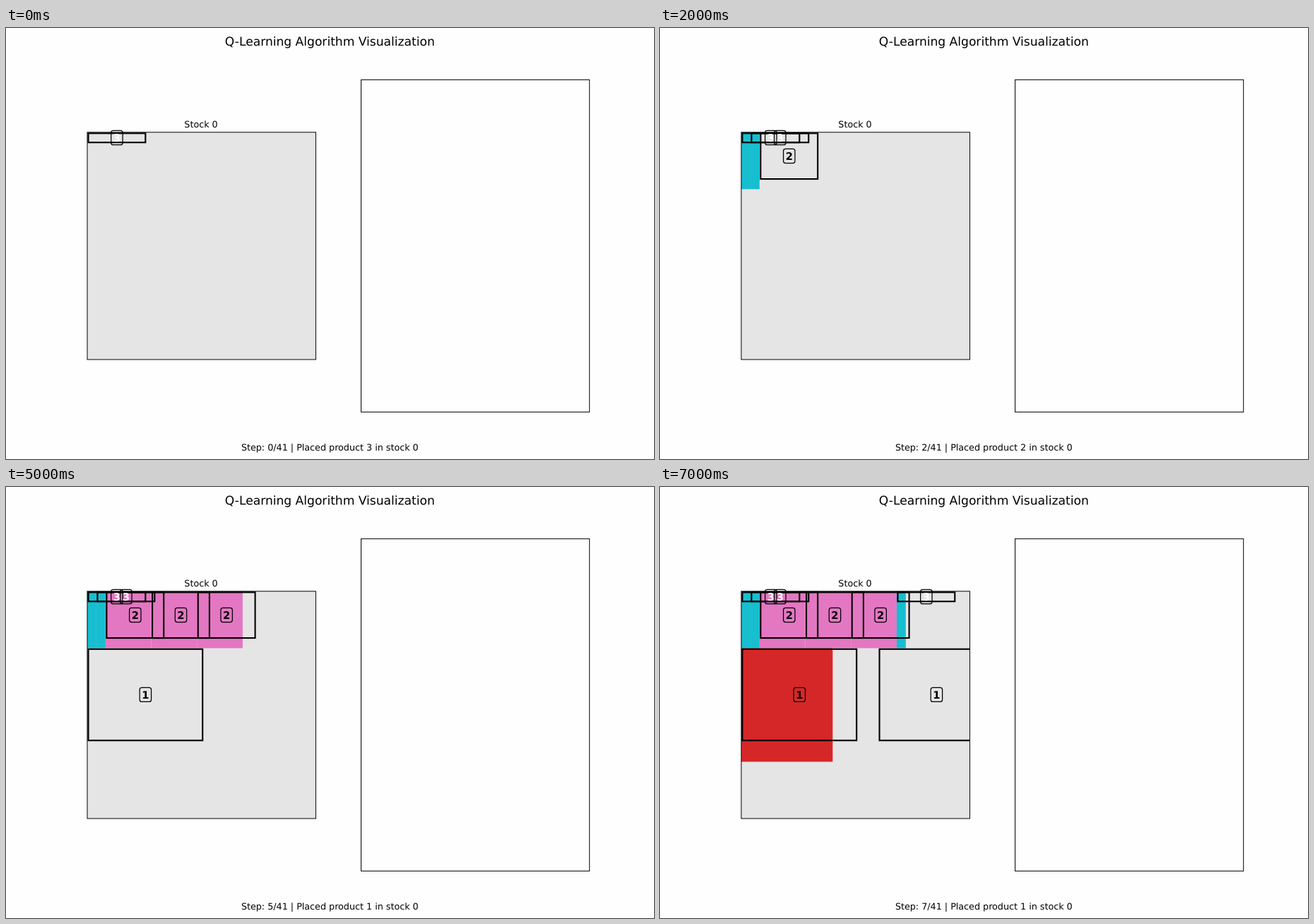
Write an HTML page that moves like this. It is 917 by 611 pixels and loops after 8 s.

```html
<!DOCTYPE html>
<html lang="en">
<head>
<meta charset="utf-8">
<title>Q-Learning Algorithm Visualization</title>
<style>
  html, body { margin: 0; height: 100%; overflow: hidden; background: #fefefe; }
  svg { display: block; }
  text { font-family: "DejaVu Sans", sans-serif; font-size: 12.72px; text-anchor: middle; text-rendering: geometricPrecision; }
  .frame { fill: none; stroke: #000; }
  .outline { fill: none; stroke: #000; stroke-width: 2.1; }
  .badge { fill: none; stroke: #000; stroke-width: 1.25; }
  .digit { font-size: 14.7px; font-weight: bold; }
</style>
</head>
<body>
<svg width="917" height="611" viewBox="0 0 917 611">
  <clipPath id="stock"><rect x="115" y="148" width="323.4" height="322"/></clipPath>
  <text x="458.3" y="25" style="font-size:17.1px">Q-Learning Algorithm Visualization</text>
  <text x="276" y="140.6">Stock 0</text>
  <rect x="115" y="148" width="323.4" height="322" fill="#e5e5e5"/>
  <g id="fills"></g>
  <g id="outlines" clip-path="url(#stock)"></g>
  <rect class="frame" x="115" y="147.8" width="323.4" height="322.2"/>
  <rect class="frame" x="502.5" y="73.4" width="323.2" height="471"/>
  <g id="labels"></g>
  <text id="status" x="458.3" y="599"></text>
</svg>
<script>
const STEP_MS = 1000, COL = 12.936, ROW = 16.1;
const products = {
  1: { w: 10, h: 10, color: '#d62728', ink: '#000' },
  2: { w: 5, h: 5, color: '#e377c2', ink: '#000' },
  3: { w: 1, h: 5, color: '#17becf', ink: '#fff' },
};
// Each placement: product, column, row
const placements = [
  [3, 0, 0], [3, 1, 0], [2, 2, 0], [2, 7, 0],
  [2, 12, 0], [1, 0, 5], [3, 17, 0], [1, 15, 5],
];

const byId = id => document.getElementById(id);

function add(parent, tag, attrs, text = '') {
  const el = document.createElementNS('http://www.w3.org/2000/svg', tag);
  for (const key in attrs) el.setAttribute(key, attrs[key]);
  el.textContent = text;
  return byId(parent).appendChild(el);
}

const steps = placements.map(([id, col, row]) => {
  const { w, h, color, ink } = products[id];
  const fill = add('fills', 'rect', {
    x: 115 + col * COL, y: 148 + row * ROW, width: w * COL, height: h * ROW, fill: color,
  });
  // Outlines have width and height swapped relative to the fills
  const x = 116.5 + col * COL, y = 149.3 + row * ROW;
  const width = h * 16.17, height = w * 12.95;
  const outline = add('outlines', 'rect', { class: 'outline', x, y, width, height });
  const cx = x + width / 2, cy = y + height / 2 - 0.3;
  const badge = add('labels', 'rect', {
    class: 'badge', x: cx - 8.2, y: cy - 10, width: 16.4, height: 20.2, rx: 3,
  });
  const digit = add('labels', 'text', { class: 'digit', x: cx, y: cy + 5.3, fill: ink }, id);
  return { fill, placed: [outline, badge, digit] };
});

const show = (el, on) => el.setAttribute('visibility', on ? 'visible' : 'hidden');

let shown = -1;
function draw() {
  const now = Math.floor(performance.now() / STEP_MS) % steps.length;
  if (now !== shown) {
    shown = now;
    steps.forEach(({ fill, placed }, i) => {
      show(fill, i < now);
      placed.forEach(el => show(el, i <= now));
    });
    byId('status').textContent =
      `Step: ${now}/41 | Placed product ${placements[now][0]} in stock 0`;
  }
  requestAnimationFrame(draw);
}
draw();
</script>
</body>
</html>
```
